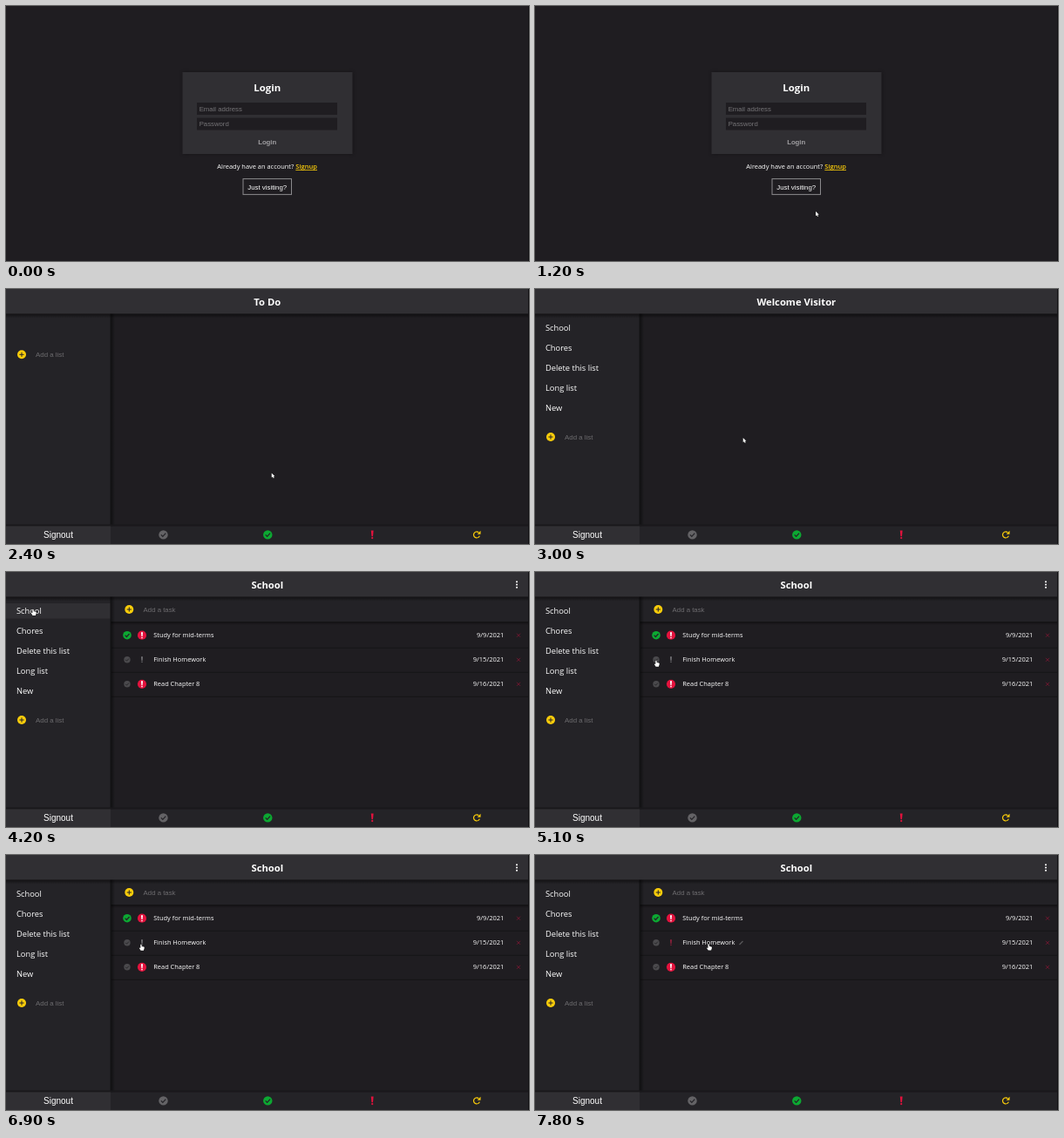
An HTML page with a canvas for the animation above (8000 ms loop, 600 px wide and 293 px high).

```html
<!DOCTYPE html>
<html lang="en">
<head>
<meta charset="utf-8">
<title>To Do</title>
<style>
html, body { margin: 0; width: 100%; height: 100%; overflow: hidden; background: #1f1d21; }
canvas { display: block; width: 600px; height: 293px; }
</style>
</head>
<body>
<canvas id="stage"></canvas>
<script>
const W = 600, H = 293, LOOP = 8000;
const canvas = document.getElementById('stage');
const ctx = canvas.getContext('2d');
const dpr = window.devicePixelRatio || 1;
canvas.width = W * dpr;
canvas.height = H * dpr;

const UI = '"Open Sans", "Noto Sans", sans-serif';
const FORM = '"Liberation Sans", Arial, sans-serif';
const C = {
  bg: '#1f1d21', panel: '#302f33', side: '#242327', line: '#151417',
  yellow: '#fbcd0a', green: '#0ca832', red: '#e3123d', grey: '#646366',
  dim: '#4b4a4d', hint: '#6d6c6f', white: '#fff'
};

// Pointer steps: start time, x and y of the tip, shape
const POINTER = [
  [900, 395, 288, arrow], [1200, 322, 236, arrow], [1500, 314, 224, arrow],
  [1800, 308, 211, hand], [2400, 304.7, 211.5, arrow], [2700, 271, 186, arrow],
  [3000, 238.7, 171, arrow], [3300, 39.5, 77, hand], [3600, 31, 42.7, hand],
  [4500, 142, 39, arrow], [4800, 148, 106, arrow], [5100, 139, 101.5, hand],
  [6600, 155, 102.5, hand], [7800, 199.2, 102.3, hand]
];
const LISTS = ['School', 'Chores', 'Delete this list', 'Long list', 'New'];

const within = (t, a, b) => t >= a && t < b;

function rect(x, y, w, h, color) {
  ctx.fillStyle = color;
  ctx.fillRect(x, y, w, h);
}

function text(str, x, y, size, { color = C.white, font = UI, weight = 400, align = 'left' } = {}) {
  ctx.font = `${weight} ${size}px ${font}`;
  ctx.textAlign = align;
  ctx.fillStyle = color;
  ctx.fillText(str, x, y);
}

function disc(x, y, r, color) {
  ctx.beginPath();
  ctx.arc(x, y, r, 0, Math.PI * 2);
  ctx.fillStyle = color;
  ctx.fill();
}

function path(points, color, width) {
  ctx.beginPath();
  points.forEach(([x, y], i) => i ? ctx.lineTo(x, y) : ctx.moveTo(x, y));
  ctx.strokeStyle = color;
  ctx.lineWidth = width;
  ctx.stroke();
}

function fade(x, y, w, h, dx, dy, alpha) {
  const g = ctx.createLinearGradient(x, y, x + dx, y + dy);
  g.addColorStop(0, `rgba(0,0,0,${alpha})`);
  g.addColorStop(1, 'rgba(0,0,0,0)');
  rect(x, y, w, h, g);
}

function check(x, y, r, color) {
  disc(x, y, r, color);
  path([[x - r * .5, y], [x - r * .13, y + r * .38], [x + r * .53, y - r * .35]], C.side, r * .25);
}

function bang(x, y, h, color) {
  const w = h * .15;
  ctx.beginPath();
  ctx.moveTo(x - w, y - h / 2);
  ctx.lineTo(x + w, y - h / 2);
  ctx.lineTo(x + w * .55, y + h * .2);
  ctx.lineTo(x - w * .55, y + h * .2);
  ctx.fillStyle = color;
  ctx.fill();
  disc(x, y + h * .4, h * .12, color);
}

function urgent(x, y) {
  disc(x, y, 5.1, C.red);
  bang(x, y, 7, C.white);
}

function plus(x, y) {
  disc(x, y, 5, C.yellow);
  path([[x - 2.6, y], [x + 2.6, y]], C.side, 1);
  path([[x, y - 2.6], [x, y + 2.6]], C.side, 1);
}

function refresh(x, y) {
  ctx.beginPath();
  ctx.arc(x, y, 3.5, .35, 5.4);
  ctx.strokeStyle = C.yellow;
  ctx.lineWidth = 1.2;
  ctx.stroke();
  ctx.beginPath();
  ctx.moveTo(x + 4.5, y - 4.6);
  ctx.lineTo(x + 4.5, y - .7);
  ctx.lineTo(x + .6, y - .7);
  ctx.fillStyle = C.yellow;
  ctx.fill();
}

function outlined() {
  ctx.closePath();
  ctx.lineWidth = .8;
  ctx.strokeStyle = '#111';
  ctx.stroke();
  ctx.fillStyle = C.white;
  ctx.fill();
}

function arrow(x, y) {
  ctx.beginPath();
  ctx.moveTo(x, y);
  ctx.lineTo(x, y + 5.2);
  ctx.lineTo(x + 1.2, y + 4.2);
  ctx.lineTo(x + 2.1, y + 6);
  ctx.lineTo(x + 3, y + 5.5);
  ctx.lineTo(x + 2.2, y + 3.8);
  ctx.lineTo(x + 3.8, y + 3.7);
  outlined();
}

function hand(x, y) {
  ctx.beginPath();
  ctx.moveTo(x - .7, y + .4);
  ctx.quadraticCurveTo(x, y - .4, x + .6, y + .4);
  ctx.lineTo(x + .7, y + 2.5);
  ctx.lineTo(x + 3.2, y + 3.1);
  ctx.quadraticCurveTo(x + 4, y + 3.5, x + 3.7, y + 4.6);
  ctx.lineTo(x + 2.9, y + 7.3);
  ctx.lineTo(x - .4, y + 7.3);
  ctx.lineTo(x - 2.2, y + 4.6);
  ctx.quadraticCurveTo(x - 2, y + 3.6, x - .7, y + 4.6);
  outlined();
}

function login(t) {
  ctx.save();
  ctx.shadowColor = 'rgba(0,0,0,.35)';
  ctx.shadowBlur = 4 * dpr;
  rect(202.5, 76, 195, 94, C.panel);
  ctx.restore();
  text('Login', 299.7, 98, 11.4, { weight: 700, align: 'center' });
  [['Email address', 111], ['Password', 128.5]].forEach(([label, y]) => {
    rect(219, y, 161, 14, C.bg);
    text(label, 221.7, y + 9.8, 7.75, { color: '#757477', font: FORM });
  });
  text('Login', 299.7, 158.5, 7.75, { color: '#a09fa2', font: FORM, weight: 700, align: 'center' });
  text('Already have an account?', 242.3, 187, 7.44);
  text('Signup', 332.3, 187, 7.5, { color: C.yellow, weight: 600 });
  rect(332.3, 188, 24.7, .8, C.yellow);

  const hover = t >= 1800;
  ctx.strokeStyle = hover ? C.yellow : '#8b8a8d';
  ctx.lineWidth = hover ? 1.3 : 1;
  ctx.strokeRect(272, 198.6, 55.5, 18);
  text('Just visiting?', 299.7, 210.6, 7.85, { font: FORM, align: 'center' });
}

function sidebar(t) {
  rect(0, 28, 120, 245, C.side);
  const loaded = t >= 3000;
  if (within(t, 3600, 4800)) rect(0, 36, 120, 17.5, C.panel);
  if (loaded) LISTS.forEach((name, i) => text(name, 12, 48.2 + i * 22.85, 9.3));
  const y = loaded ? 170 : 75.3;
  plus(18, y);
  text('Add a list', 34, y + 2.8, 7.9, { color: C.hint, font: FORM });
}

function task(y, name, date, done, mark) {
  rect(121, y + 14, 478, 1, C.line);
  check(139, y, done ? 4.8 : 3.7, done ? C.green : C.dim);
  if (mark === 'on') urgent(156, y);
  else bang(156, y - .2, 6.5, mark);
  text(name, 169.3, y + 2.6, 7.4);
  text(date, 571.3, y + 2.6, 7.5, { align: 'right' });
  path([[586, y - 2], [590, y + 2]], '#7a1732', .9);
  path([[590, y - 2], [586, y + 2]], '#7a1732', .9);
}

function tasks(t) {
  rect(120, 28, 479, 29, '#232226');
  fade(120, 57, 479, 4, 0, 4, .45);
  plus(141.3, 43);
  text('Add a task', 157.6, 46, 7.8, { color: C.hint, font: FORM });

  const done = within(t, 5400, 5700) || within(t, 6000, 6300);
  const mark = t < 7200 ? '#77767a' : t < 7500 ? 'on' : '#96203d';
  task(72.7, 'Study for mid-terms', '9/9/2021', true, 'on');
  task(100.8, 'Finish Homework', '9/15/2021', done, mark);
  task(128.8, 'Read Chapter 8', '9/16/2021', false, 'on');
  if (t >= 7800) path([[234.5, 103], [238.5, 99]], '#59585b', 1.2);
}

function board(t) {
  const open = t >= 4200;
  if (open) tasks(t);
  sidebar(t);
  fade(120, 28, 5, 245, 5, 0, .5);
  rect(119.5, 28, 1, 245, C.line);

  rect(0, 0, W, 28.5, C.panel);
  fade(0, 28.5, W, 5, 0, 5, .5);
  const title = open ? 'School' : t >= 3000 ? 'Welcome Visitor' : 'To Do';
  text(title, 299.8, 19, 11.25, { weight: 700, align: 'center' });
  if (open) [11.2, 14.5, 17.8].forEach(y => disc(586, y, 1.05, C.white));

  fade(0, 272.5, W, 4, 0, -4, .4);
  rect(0, 270.5, W, 2, '#19181b');
  rect(0, 272.5, W, 20.5, C.side);
  rect(0, 272.5, 120, 20.5, C.panel);
  text('Signout', 60, 286.2, 10, { font: FORM, align: 'center' });
  check(180.5, 282.4, 5.2, C.grey);
  check(300.3, 282.4, 5.2, C.green);
  bang(420.2, 282.3, 9.5, C.red);
  refresh(540, 282.4);
}

function draw(t) {
  ctx.setTransform(dpr, 0, 0, dpr, 0, 0);
  rect(0, 0, W, H, C.bg);
  if (t < 2400) login(t);
  else board(t);
  rect(599, 0, 1, H, '#111013');
  const step = POINTER.filter(p => p[0] <= t).pop();
  if (step) step[3](step[1], step[2]);
}

const start = performance.now();
function tick() {
  draw((performance.now() - start) % LOOP);
  requestAnimationFrame(tick);
}
tick();
</script>
</body>
</html>
```
